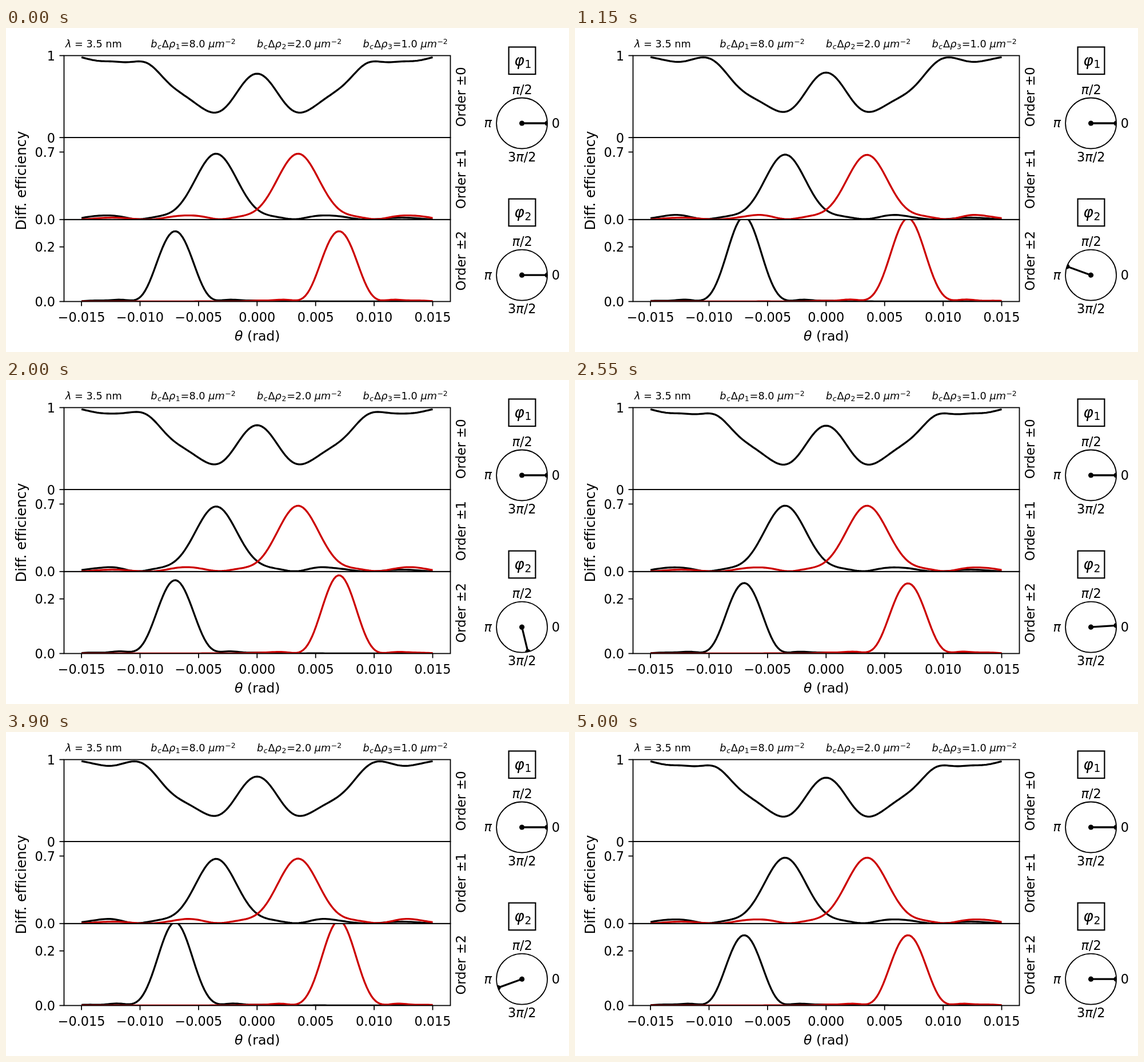
An HTML page that plays this animation: 985x568 px, repeating every 5050 ms.

```html
<!DOCTYPE html>
<html lang="en">
<head>
<meta charset="utf-8">
<title>Diffraction efficiency</title>
<style>
  html, body { margin: 0; width: 100%; height: 100%; overflow: hidden; background: #fff; }
  svg { display: block; width: 985px; height: 568px; }
  text { font-family: "DejaVu Sans", sans-serif; font-variant-ligatures: none; white-space: pre; }
  .i { font-style: italic; }
  .axis { fill: none; stroke: #000; stroke-width: 1.8; }
  .curve { fill: none; stroke-width: 3.3; stroke-linejoin: round; }
</style>
</head>
<body>
<svg id="stage" viewBox="0 0 985 568"></svg>
<script>
const LOOP = 5050, STEP = 50, FRAMES = 100;
const LEFT = 101.5, RIGHT = 777.5, MID = 439.3, PX_PER_RAD = 20480;
const EDGES = [48.4, 192.1, 335.8, 479.5];
const Y_MAX = [1, 0.85, 0.3];
const RED = '#cc0000';
const DIAL_X = 902.6, DIAL_Y = [167, 433.2], DIAL_R = 44.5;

// Grating in micrometres: wavelength, period, thickness, three harmonics
const WAVE = 0.0035, PERIOD = 0.5, DEPTH = 78, HARMONICS = [8, 2, 1];
const DETUNE = Math.PI * WAVE * DEPTH / PERIOD ** 2;
const COUPLING = HARMONICS.map(h => WAVE * h * DEPTH / 2);
const M = 4, N = 2 * M + 1, SLICES = 80, POINTS = 161, THETA_MAX = 0.015;

// Fourier coefficients of one thin phase slice
function sliceCoefs(phi) {
  const re = [], im = [], samples = 64;
  for (let j = -2 * M; j <= 2 * M; j++) {
    let a = 0, b = 0;
    for (let k = 0; k < samples; k++) {
      const x = 2 * Math.PI * k / samples;
      const v = 2 * (COUPLING[0] * Math.cos(x) + COUPLING[1] * Math.cos(2 * x) +
                     COUPLING[2] * Math.cos(3 * x - phi));
      const ang = -v / SLICES - j * x;
      a += Math.cos(ang);
      b += Math.sin(ang);
    }
    re.push(a / samples);
    im.push(b / samples);
  }
  return { re, im };
}

// Intensities of all orders behind the grating for one angle of incidence
function diffract(theta, { re, im }) {
  const p = 2 * theta * PERIOD / WAVE;
  const dc = [], ds = [];
  for (let m = -M; m <= M; m++) {
    const ang = -DETUNE * (m * m - m * p) / SLICES;
    dc.push(Math.cos(ang));
    ds.push(Math.sin(ang));
  }
  let ar = new Float64Array(N), ai = new Float64Array(N);
  let br = new Float64Array(N), bi = new Float64Array(N);
  ar[M] = 1;
  for (let s = 0; s < SLICES; s++) {
    for (let m = 0; m < N; m++) {
      let x = 0, y = 0;
      for (let n = 0; n < N; n++) {
        const j = m - n + 2 * M;
        x += re[j] * ar[n] - im[j] * ai[n];
        y += re[j] * ai[n] + im[j] * ar[n];
      }
      br[m] = x * dc[m] - y * ds[m];
      bi[m] = x * ds[m] + y * dc[m];
    }
    [ar, br] = [br, ar];
    [ai, bi] = [bi, ai];
  }
  return Array.from(ar, (x, m) => x * x + ai[m] * ai[m]);
}

const CURVES = [
  { order: 0, color: '#000' },
  { order: -1, color: '#000' }, { order: 1, color: RED },
  { order: -2, color: '#000' }, { order: 2, color: RED }
];

function curvePaths(phi) {
  const coefs = sliceCoefs(phi);
  const paths = CURVES.map(() => []);
  for (let i = 0; i < POINTS; i++) {
    const theta = THETA_MAX * (2 * i / (POINTS - 1) - 1);
    const eff = diffract(theta, coefs);
    const x = (MID + theta * PX_PER_RAD).toFixed(2);
    CURVES.forEach(({ order }, c) => {
      const row = Math.abs(order);
      const base = EDGES[row + 1], height = base - EDGES[row];
      paths[c].push(x + ' ' + (base - eff[order + M] / Y_MAX[row] * height).toFixed(2));
    });
  }
  return paths.map(p => 'M' + p.join('L'));
}

// Static markup
const text = (x, y, size, body, anchor = 'middle', extra = '') =>
  `<text x="${x}" y="${y}" font-size="${size}" text-anchor="${anchor}" ${extra}>${body}</text>`;
const upright = (x, y, size, body) =>
  text(0, 0, size, body, 'middle', `transform="translate(${x} ${y}) rotate(-90)"`);
const it = s => `<tspan class="i">${s}</tspan>`;
const line = (x1, y1, x2, y2) => `<path class="axis" d="M${x1} ${y1}L${x2} ${y2}"/>`;
// Small raised or lowered part; the next part returns to the baseline
const script = (s, size, shift, next, cls = '') =>
  `<tspan class="${cls}" font-size="${size}" dx="0.6" dy="${shift}">${s}</tspan>` +
  (next ? `<tspan dx="0.9" dy="${-shift}">${next}</tspan>` : '');

function header() {
  const out = [text(104, 34, 17.7, it('λ') + ' = 3.5 nm', 'start')];
  HARMONICS.forEach((h, i) => {
    out.push(text(253.3 + 185.6 * i, 34, 17.7,
      it('b') + script('c', 12.4, 2.8, 'Δ', 'i') + it('ρ') +
      script(i + 1, 12.4, 2.8, '=') + h.toFixed(1) + ' ' + it('μm') +
      script('−2', 12.4, -6.4), 'start'));
  });
  return out.join('');
}

function axes() {
  const out = [];
  for (let r = 0; r < 3; r++) {
    const top = EDGES[r], h = EDGES[r + 1] - top;
    out.push(`<rect class="axis" x="${LEFT}" y="${top}" width="${RIGHT - LEFT}" height="${h}"/>`);
    out.push(upright(804, top + h / 2 + 0.6, 22.6, 'Order ±' + r));
  }
  const yTicks = [['1', 0, 1], ['0', 0, 0], ['0.7', 1, 0.7], ['0.0', 1, 0], ['0.2', 2, 0.2], ['0.0', 2, 0]];
  for (const [label, row, v] of yTicks) {
    const y = EDGES[row + 1] - v / Y_MAX[row] * (EDGES[row + 1] - EDGES[row]);
    out.push(line(LEFT - 8, y, LEFT, y), text(86, y + 8.4, 22.4, label, 'end'));
  }
  for (let k = -3; k <= 3; k++) {
    const x = MID + k * 0.005 * PX_PER_RAD;
    const label = (k < 0 ? '−' : '') + (Math.abs(k) * 0.005).toFixed(3);
    out.push(line(x, EDGES[3], x, EDGES[3] + 8), text(x, 515.4, 22.4, label));
  }
  out.push(text(439.8, 547.5, 23.6, it('θ') + ' (rad)'), upright(34.8, 267.5, 24.4, 'Diff. efficiency'));
  return out.join('');
}

function dial(i) {
  const y = DIAL_Y[i], pi = it('π');
  return `<rect x="879.6" y="${y - 133.6}" width="46.8" height="47.6" fill="none" stroke="#000" stroke-width="2.2"/>` +
    text(889.3, y - 101, 26.7, it('φ') + script(i + 1, 18.7, 4.3), 'start') +
    text(903.2, y - 51.3, 22.4, pi + '/2') +
    text(902.8, y + 67.2, 22.4, '3' + pi + '/2') +
    text(843.3, y + 7.4, 22.4, pi) +
    text(961.8, y + 7.8, 22.4, '0') +
    `<g clip-path="url(#disc${i})"><g id="hand${i}">` +
    `<path d="M${DIAL_X} ${y}h${DIAL_R}" stroke="#000" stroke-width="3.3"/>` +
    `<circle cx="${DIAL_X}" cy="${y}" r="4.6"/><circle cx="${DIAL_X + DIAL_R}" cy="${y}" r="4.6"/></g></g>` +
    `<circle class="axis" cx="${DIAL_X}" cy="${y}" r="${DIAL_R}"/>`;
}

const stage = document.getElementById('stage');
stage.innerHTML =
  '<defs>' +
  [0, 1, 2].map(r => `<clipPath id="panel${r}"><rect x="${LEFT}" y="${EDGES[r]}" ` +
    `width="${RIGHT - LEFT}" height="${EDGES[r + 1] - EDGES[r]}"/></clipPath>`).join('') +
  DIAL_Y.map((y, i) => `<clipPath id="disc${i}"><circle cx="${DIAL_X}" cy="${y}" r="${DIAL_R}"/></clipPath>`).join('') +
  '</defs>' +
  CURVES.map(c => `<g clip-path="url(#panel${Math.abs(c.order)})"><path class="curve" stroke="${c.color}"/></g>`).join('') +
  header() + axes() + dial(0) + dial(1);

const curves = [...stage.querySelectorAll('.curve')];
const hand = document.getElementById('hand1');
const cache = [];
let shown = -1;

function render(ms) {
  const n = Math.max(0, Math.floor((ms % LOOP) / STEP) - 1);
  if (n === shown) return;
  shown = n;
  const turn = 2 * n / (FRAMES - 1);
  cache[n] = cache[n] || curvePaths(2 * Math.PI * turn);
  curves.forEach((el, i) => el.setAttribute('d', cache[n][i]));
  hand.setAttribute('transform', `rotate(${-360 * turn} ${DIAL_X} ${DIAL_Y[1]})`);
}

const start = performance.now();
function tick() {
  render(performance.now() - start);
  requestAnimationFrame(tick);
}
tick();
</script>
</body>
</html>
```
